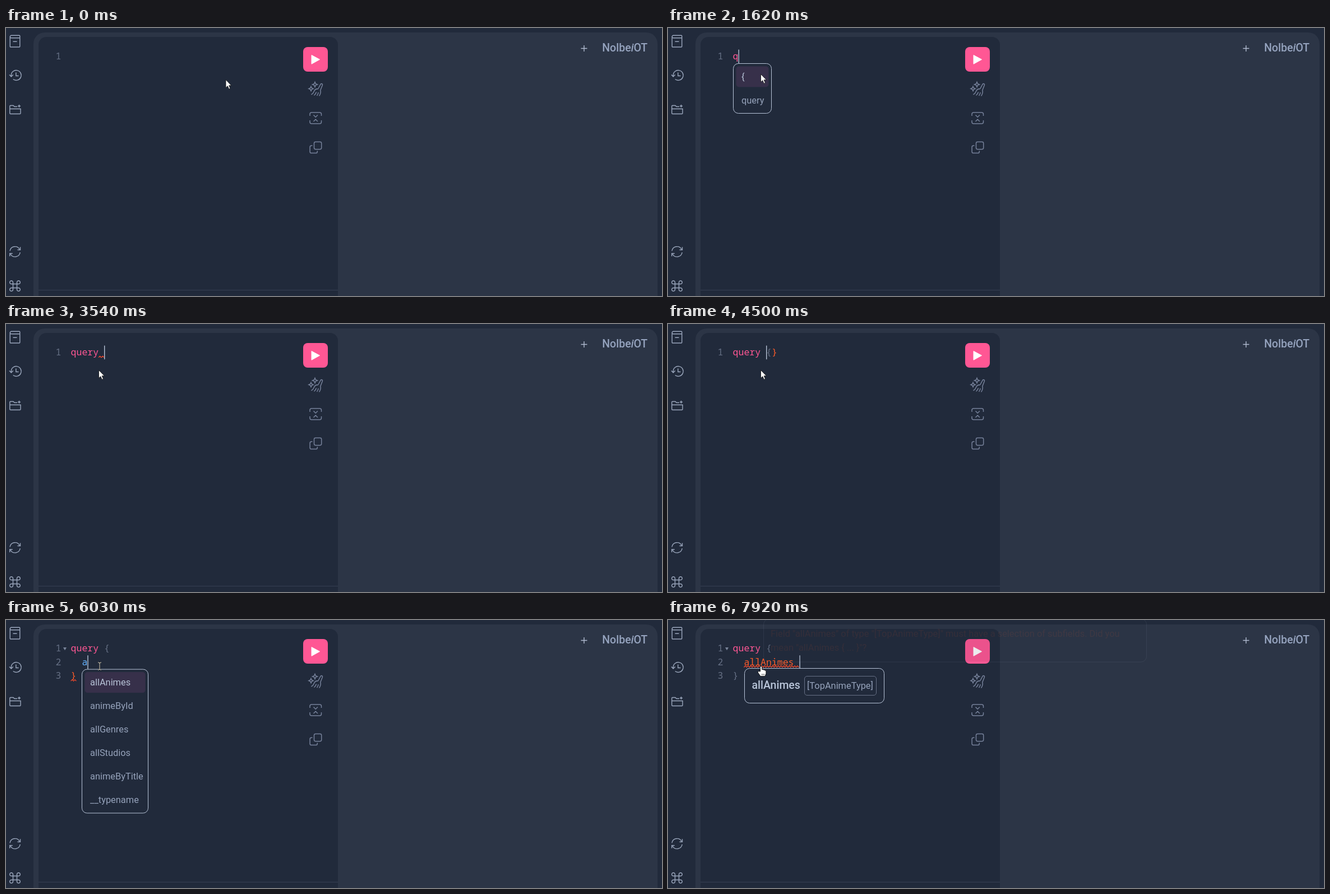
Animation of 1170 by 479 pixels, one loop 7990 ms. Source, as an HTML page:

```html
<!DOCTYPE html>
<html lang="en">
<head>
<meta charset="utf-8">
<title>Query editor</title>
<style>
  html, body { margin: 0; width: 100%; height: 100%; overflow: hidden; background: #212a3b; }
  svg { display: block; width: 100%; height: 100%; }
  text { font: 16.4px Roboto, sans-serif; white-space: pre; }
  .mono { font: 16.5px "Noto Sans Mono", monospace; }
  .title { font-size: 19.5px; font-weight: 500; }
  .icon { fill: none; stroke: #9ba7bd; stroke-width: 1.4; }
  .tool { stroke: #76819a; stroke-width: 1.5; }
  .keyword { fill: #ff5794; }
  .field { fill: #65b3ff; }
  .punct { fill: #667085; }
  .error { fill: #ff5c29; }
  .wave { fill: none; stroke: #ff4a2b; stroke-width: 1.2; }
</style>
</head>
<body>
<svg viewBox="0 0 1170 479">
  <rect width="1170" height="479" fill="#212a3b"/>
  <path d="M49 479V28a20 20 0 0 1 20-20H1142a20 20 0 0 1 20 20V479Z" fill="#2c3546"/>
  <path d="M58 479V30a14 14 0 0 1 14-14H578a14 14 0 0 1 14 14V479Z" fill="#212a3b"/>
  <path d="M58 468.5H592" stroke="#364052"/>

  <g class="icon">
    <g transform="translate(6.5 12.5)">
      <path d="M.75 3A2.25 2.25 0 0 0 3 5.25H18.25V20.5a1 1 0 0 1-1 1H1.75a1 1 0 0 1-1-1V3A2.25 2.25 0 0 1 3 .75H17.25a1 1 0 0 1 1 1V5.25M6 11.75H13"/>
    </g>
    <path d="M6 83.5l3.3 3.5 3.4-3.5M9.3 86.5V84.5a8.9 8.9 0 1 1 3.4 7M17.8 79.5V85.5H22.5"/>
    <path d="M20 140.5H15l-2-2H8a1.2 1.2 0 0 0-1.2 1.2V152.3a1.2 1.2 0 0 0 1.2 1.2H24.8a1.2 1.2 0 0 0 1.2-1.2V144.5H7M23.5 137V142M21 139.5H26"/>
    <path d="M7 398.5a9.2 9.2 0 0 1 17.2-3M25.5 391.5V396.5H20.5M25.2 401a9.2 9.2 0 0 1-17.2 3M6.7 408V403H11.7"/>
    <path d="M12.5 457.5H19.5V464.5H12.5ZM12.5 457.5H9.7a2.9 2.9 0 1 1 2.8-2.9ZM19.5 457.5V454.6a2.9 2.9 0 1 1 2.8 2.9ZM19.5 464.5H22.3a2.9 2.9 0 1 1-2.8 2.9ZM12.5 464.5V467.4a2.9 2.9 0 1 1-2.8-2.9Z"/>
    <path d="M1025.5 36.5H1036.5M1031 31V42" stroke="#b0bbd0"/>
  </g>
  <text class="title" x="1144" y="42" text-anchor="end" fill="#95a3be">Nolbe<tspan font-style="italic">i</tspan>OT</text>

  <rect x="530" y="34" width="44" height="44" rx="8" fill="#ff5794"/>
  <path d="M545 48.5L559.5 56.3L545 64.3Z" fill="#fff" stroke="#fff" stroke-linejoin="round"/>
  <g class="icon tool">
    <path d="M551 96.5l1.3 3.2 3.2 1.3-3.2 1.3-1.3 3.2-1.3-3.2-3.2-1.3 3.2-1.3ZM544 104.5l1.2 2.8 2.8 1.2-2.8 1.2-1.2 2.8-1.2-2.8-2.8-1.2 2.8-1.2Z"/>
    <path d="M556.5 109l4.7-8.6a1.8 1.8 0 0 1 3.2 1.6l-3.6 9.2q1.5 5-2.3 10.3M556.5 109q-4.5-.8-6.7 3.4-1.7 4.5-5.3 6.8M549.5 120.5q3-2.5 4-6M554.5 121q2.4-3 2.6-6"/>
    <path d="M542 157V154a3 3 0 0 1 3-3H559.500a3 3 0 0 1 3 3V157M542 165V168a3 3 0 0 0 3 3H559.500a3 3 0 0 0 3-3V165M548.500 155.500l3.700 3.700 3.700-3.700M548.500 167l3.700-3.700 3.700 3.700"/>
    <rect x="549.500" y="203.500" width="13.200" height="13.200" rx="2.600"/>
    <path d="M546.500 210.300H544.700a2.600 2.600 0 0 0-2.600 2.600V220.900a2.600 2.600 0 0 0 2.600 2.600H552.700a2.600 2.600 0 0 0 2.600-2.600V219.500"/>
  </g>

  <g id="editor"></g>
  <g id="mouse"></g>
</svg>
<script>
const DURATION = 7990;
const LEFT = 115.6, CHAR = 9.9, TOP = 38.6, ROW = 24.6;
const editor = document.getElementById('editor');
const mouse = document.getElementById('mouse');

const columnX = col => LEFT + col * CHAR;
const baseline = row => 56 + row * ROW;

// Token: [row, column, text, class]
const keyword = (text, cls = 'keyword') => [0, 0, text, cls];
const query = keyword('query');
const open = [0, 6, '{', 'punct'];
const close = cls => [2, 0, '}', cls];
const block = (field, fieldClass, closeClass = 'punct') =>
  [query, open, [1, 2, field, fieldClass], close(closeClass)];

const fields = ['allAnimes', 'animeById', 'allGenres', 'allStudios', 'animeByTitle', '__typename'];

// Each entry changes part of the state from its time on.
// caret: [row, column]; wave: [row, from, to]; hints: [items, row, column, width]
const timeline = [
  [0, { tokens: [], rows: 1, caret: null, wave: null, hints: null, fold: false, tip: false, alert: false, pointer: 'arrow' }],
  [550, { caret: [0, 0] }],
  [1080, { caret: null }],
  [1540, { tokens: [keyword('q')], caret: [0, 1] }],
  [1620, { hints: [['{', 'query'], 0, 0, 69] }],
  [1820, { tokens: [keyword('que')], caret: [0, 3], hints: [['query'], 0, 0, 69] }],
  [2220, { tokens: [keyword('quer')], caret: [0, 4] }],
  [2290, { tokens: [query], caret: [0, 5], hints: null }],
  [2750, { tokens: [keyword('query', 'error')], wave: [0, 0, 5] }],
  [2820, { caret: null }],
  [3080, { caret: [0, 6] }],
  [3540, { tokens: [query], wave: [0, 5, 6] }],
  [3610, { caret: null }],
  [3670, { tokens: [query, open, [0, 7, '}}', 'error']], caret: [0, 8] }],
  [4150, { wave: [0, 7, 9], caret: null }],
  [4500, { tokens: [query, open, [0, 7, '}', 'error']], wave: null, caret: [0, 6] }],
  [4760, { caret: [0, 7] }],
  [4960, { wave: [0, 7, 8] }],
  [5220, { tokens: block('', 'field', 'error'), rows: 3, caret: [1, 2], wave: [2, 0, 1], pointer: 'beam' }],
  [5690, { fold: true }],
  [5750, { caret: null }],
  [5820, { tokens: block('a', 'field', 'error'), caret: [1, 3] }],
  [6030, { hints: [fields, 1, 2, 119] }],
  [6320, { tokens: block('al', 'field', 'error'), caret: [1, 4], hints: [['allAnimes'], 1, 2, 99] }],
  [6750, { tokens: block('al', 'error'), wave: [1, 2, 4] }],
  [6890, { tokens: block('allAnimes', 'field'), caret: [1, 11], wave: null, hints: null }],
  [7380, { tokens: block('allAnimes', 'error'), wave: [1, 2, 11] }],
  [7450, { caret: null }],
  [7540, { caret: [1, 12], wave: [1, 2, 12] }],
  [7630, { pointer: 'hand' }],
  [7720, { tip: true }],
  [7920, { alert: true }],
];

const text = (x, y, content, attrs) => `<text x="${x}" y="${y}" ${attrs}>${content}</text>`;
const box = (x, y, w, h, r, attrs) =>
  `<rect x="${x}" y="${y}" width="${w}" height="${h}" rx="${r}" ${attrs}/>`;
const POPOVER = 'fill="#212a3b" stroke="#b7c3d7"';

function drawWave([row, from, to]) {
  const y = baseline(row) + 2.6;
  let path = '';
  for (let x = columnX(from), i = 0; x <= columnX(to); x += 2.45, i++)
    path += `${i ? 'L' : 'M'}${x} ${y + (i % 2 ? -1.3 : 1.3)}`;
  return `<path class="wave" d="${path}"/>`;
}

function drawHints([items, row, col, width]) {
  const x = Math.round(columnX(col)) + .5, y = TOP + (row + 1) * ROW + .3;
  return box(x, y, width - 1, items.length * 42 + 5, 9, POPOVER) +
    box(x + 5, y + 5, width - 11, 37, 5, 'fill="#37304a"') +
    items.map((item, i) => text(x + 14.5, y + 29 + i * 42, item, `fill="${i ? '#95a2ba' : '#b7c3d7'}"`)).join('');
}

const drawTip = () =>
  box(136.5, 86.5, 249, 62, 9, POPOVER) +
  text(149.5, 122.5, 'allAnimes', 'class="title" fill="#b7c3d7"') +
  box(243.5, 100.5, 128, 34, 4.5, 'fill="none" stroke="#667085"') +
  text(248, 123, '[TopAnimeType]', 'fill="#95a2ba"');

const drawAlert = () => '<g opacity=".085">' +
  box(170.5, -2, 683, 77, 10, POPOVER) +
  text(183, 30, 'Field "allAnimes" of type "[TopAnimeType]" must have a selection of subfields. Did you', 'class="error"') +
  text(183, 54.5, 'mean "allAnimes { ... }"?', 'class="error"') + '</g>';

function drawEditor(s) {
  let out = '';
  for (let row = 0; row < s.rows; row++)
    out += text(98.5, baseline(row), row + 1, 'class="mono punct" text-anchor="end"');
  for (const [row, col, content, cls] of s.tokens)
    out += text(columnX(col), baseline(row), content, `class="mono ${cls}"`);
  if (s.fold) out += '<path d="M102 49H108L105 54.300Z" fill="#7a859a"/>';
  if (s.wave) out += drawWave(s.wave);
  if (s.caret) out += box(columnX(s.caret[1]), TOP + s.caret[0] * ROW, 1.4, ROW, 0, 'fill="#b7c3d7"');
  if (s.hints) out += drawHints(s.hints);
  if (s.tip) out += drawTip();
  if (s.alert) out += drawAlert();
  return out;
}

const pointers = {
  arrow: '<path d="M0 0V14.200L3.300 11.200L5.700 16.700L8 15.700L5.700 10.300H10Z" fill="#fff" stroke="#111" stroke-width=".8"/>',
  beam: '<path d="M-3 -6.500H-1L0 -5.500L1 -6.500H3M0 -5.500V5.500M-3 6.500H-1L0 5.500L1 6.500H3" fill="none" stroke="#111" stroke-width="2.200"/>' +
    '<path d="M-3 -6.500H-1L0 -5.500L1 -6.500H3M0 -5.500V5.500M-3 6.500H-1L0 5.500L1 6.500H3" fill="none" stroke="#e8e5d8"/>',
  hand: '<path d="M-2.500 1V-7a1.500 1.500 0 0 1 3 0V-2.500q2-1 2.700.700 2-.700 2.500.900 2.200-.400 2.200 1.600V4.500L6 9.500H-2L-6.500 3q-.800-2 1.200-2.300Z" fill="#fff" stroke="#111" stroke-width=".9"/>' +
    '<path d="M.5 5V8M2.500 5V8M4.500 5V8" stroke="#333" stroke-width=".7"/>',
};

function pointerPosition(t, pointer) {
  if (pointer === 'beam') return [167, 82.500];
  if (pointer === 'hand') return [167, 91];
  if (t < 70) return [392, 92.500];
  if (t < 290) return [375, 83];
  if (t >= 1010) return [165.500, 82.500];
  const progress = Math.min(1, (Math.floor((t - 290) / 72) + 1) / 8);
  const eased = 1 - (1 - progress) ** 2;
  return [375 - 211 * eased, 83 + eased];
}

let lastMarkup = '';
function frame(now) {
  const t = now % DURATION;
  const state = Object.assign({}, ...timeline.filter(([start]) => start <= t).map(([, change]) => change));
  const markup = drawEditor(state);
  if (markup !== lastMarkup) editor.innerHTML = lastMarkup = markup;
  const [x, y] = pointerPosition(t, state.pointer);
  mouse.setAttribute('transform', `translate(${x} ${y})`);
  if (mouse.dataset.shape !== state.pointer) {
    mouse.dataset.shape = state.pointer;
    mouse.innerHTML = pointers[state.pointer];
  }
}

const begin = performance.now();
function loop() {
  frame(performance.now() - begin);
  requestAnimationFrame(loop);
}
loop();
</script>
</body>
</html>
```
